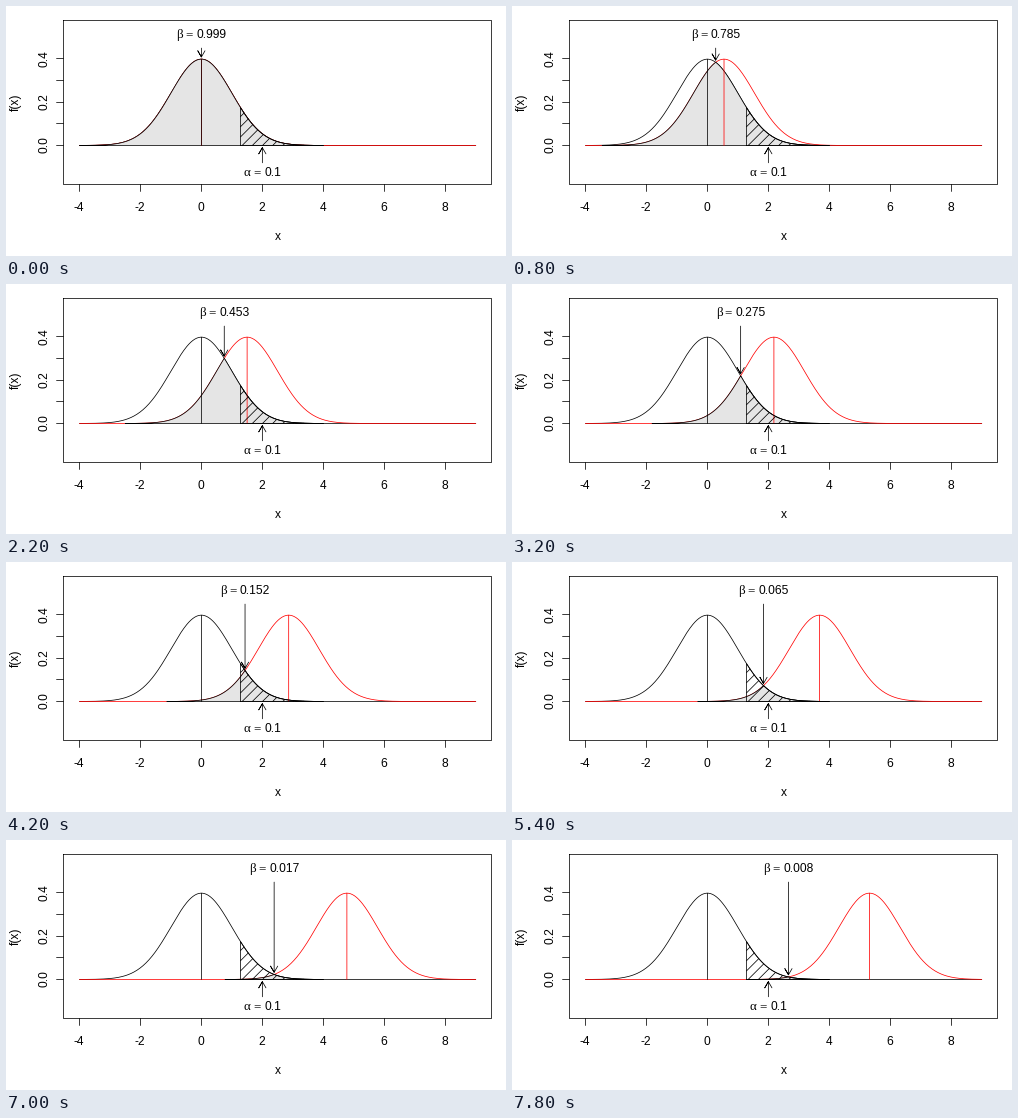
Animation, 500 px wide and 250 px high, one loop 8 s. Source, as a matplotlib script:

```python
import math

import numpy as np
import matplotlib.pyplot as plt
from matplotlib.animation import FuncAnimation

W, H, DPI = 500, 250, 100
PX = 72 / DPI                      # one pixel in points
FRAMES, INTERVAL = 40, 200
STEP = 6 / 44                      # shift of the alternative per frame
CRIT = 1.2816                      # upper 10 % point
LEFT, RIGHT, TOP, BOTTOM = 57.6, 485.6, 14.4, 178
XS = (RIGHT - LEFT) / 14.04
YS = (BOTTOM - TOP) / 0.756
THIN = 0.75 * PX

fig = plt.figure(figsize=(W / DPI, H / DPI), dpi=DPI, facecolor="white")
ax = fig.add_axes([0, 0, 1, 1])
ax.set_xlim(0, W)
ax.set_ylim(H, 0)
ax.axis("off")


def px(x):
    return LEFT + (np.asarray(x) + 4.52) * XS


def py(y):
    return BOTTOM - (np.asarray(y) + 0.178) * YS


def pdf(x, mean=0.0):
    return np.exp(-(np.asarray(x) - mean) ** 2 / 2) / math.sqrt(2 * math.pi)


def line(x=(), y=(), color="black", z=2):
    return ax.plot(x, y, color=color, lw=THIN, zorder=z, snap=False,
                   solid_capstyle="round", solid_joinstyle="round")[0]


def crisp_line(x, y):
    """Straight line through pixel centres."""
    line(np.floor(x) + 0.5, np.floor(y) + 0.5)


def write(x, y, s, ha="center", font="Liberation Sans", size=12, rotation=0):
    return ax.text(x, y, s, ha=ha, va="baseline", family=font,
                   fontsize=size * PX, rotation=rotation,
                   rotation_mode="anchor", zorder=8)


def formula(y, greek):
    """Greek letter, equals sign and number as three pieces."""
    return [write(0, y, greek, "left", "Liberation Serif", 13),
            write(0, y, "=", "left", "Liberation Serif", 13),
            write(0, y, "", "left")]


def set_formula(parts, center, greek_w, number):
    number_w = 6.67 * (len(number) - 1) + 3.33
    x = center - (greek_w + 13.2 + number_w) / 2
    parts[0].set_x(x)
    parts[1].set_x(x + greek_w + 2.5)
    parts[2].set_x(x + greek_w + 13.2)
    parts[2].set_text(number)


def arrow_points(x, start, tip):
    back = tip - math.copysign(6.2, tip - start)
    return ([x, x, x - 3.6, x, x + 3.6], [start, tip, back, tip, back])


def draw_axes():
    crisp_line([LEFT, RIGHT, RIGHT, LEFT, LEFT],
               [TOP, TOP, BOTTOM, BOTTOM, TOP])
    for v in range(-4, 9, 2):
        crisp_line([px(v)] * 2, [BOTTOM, BOTTOM + 7.2])
        write(px(v) - 0.4, 205, str(v))
    for i in range(5):
        y = py(i / 10)
        crisp_line([LEFT - 7.2, LEFT], [y, y])
        if i % 2 == 0:
            write(42, y - 0.5, f"{i / 10:.1f}", rotation=90)
    write((LEFT + RIGHT) / 2, 234, "x")
    write(13, (TOP + BOTTOM) / 2, "f(x)", rotation=90)


def draw_tail():
    """Hatched rejection region."""
    x = np.linspace(CRIT, 4, 150)
    line(px(np.r_[CRIT, x, 4, CRIT]), py(np.r_[0, pdf(x), 0, 0]), z=6)
    gap = 7.2 * math.sqrt(2)
    t = np.linspace(0, 45, 1801)
    for n in range(12):
        start = px(0) + n * gap
        u = (start + t - px(0)) / XS
        inside = t[(u >= CRIT) & (u <= 4) & (t <= YS * pdf(u))]
        if inside.size:
            ends = inside[[0, -1]]
            line(start + ends, py(0) - ends, z=6)


draw_axes()
draw_tail()

grid = np.linspace(-4, 9, 400)
line(px(grid), py(pdf(grid)), z=2.5)
line([px(0)] * 2, [py(0), py(pdf(0))], z=5.5)
line(*arrow_points(px(2), py(-0.08), py(-0.01)), z=7)
set_formula(formula(170, "α"), px(2), 7.6, "0.1")

alt_curve = line(color="red", z=3)
alt_mean = line(color="red", z=5)
overlap = ax.fill([0, 1, 1], [0, 0, 1], fc="#e5e5e5", ec="black", lw=THIN,
                  zorder=4, snap=False)[0]
beta_arrow = line(z=7)
beta_label = formula(32, "β")


def update(k):
    mean = k * STEP
    mid = mean / 2

    alt_curve.set_data(px(grid), py(pdf(grid, mean)))
    alt_mean.set_data([px(mean)] * 2, [py(0), py(pdf(0))])

    x = np.union1d(np.linspace(mean - 4, 4, 300), [mid])
    low = np.minimum(pdf(x), pdf(x, mean))
    overlap.set_xy(np.column_stack([px(np.r_[x[0], x, x[-1]]),
                                    py(np.r_[0, low, 0])]))

    beta_arrow.set_data(*arrow_points(px(mid), py(0.45), py(pdf(mid) + 0.01)))
    # overlap area without the tails cut off at four deviations
    beta = math.erfc((mid + 0.0006) / math.sqrt(2)) - math.erfc(4 / math.sqrt(2))
    set_formula(beta_label, px(mid), 6.6, f"{beta:.3f}")
    return [alt_curve, alt_mean, overlap, beta_arrow, *beta_label]


anim = FuncAnimation(fig, update, frames=FRAMES, interval=INTERVAL,
                     init_func=lambda: update(0), repeat=True,
                     repeat_delay=0, blit=False)
plt.show()
```
